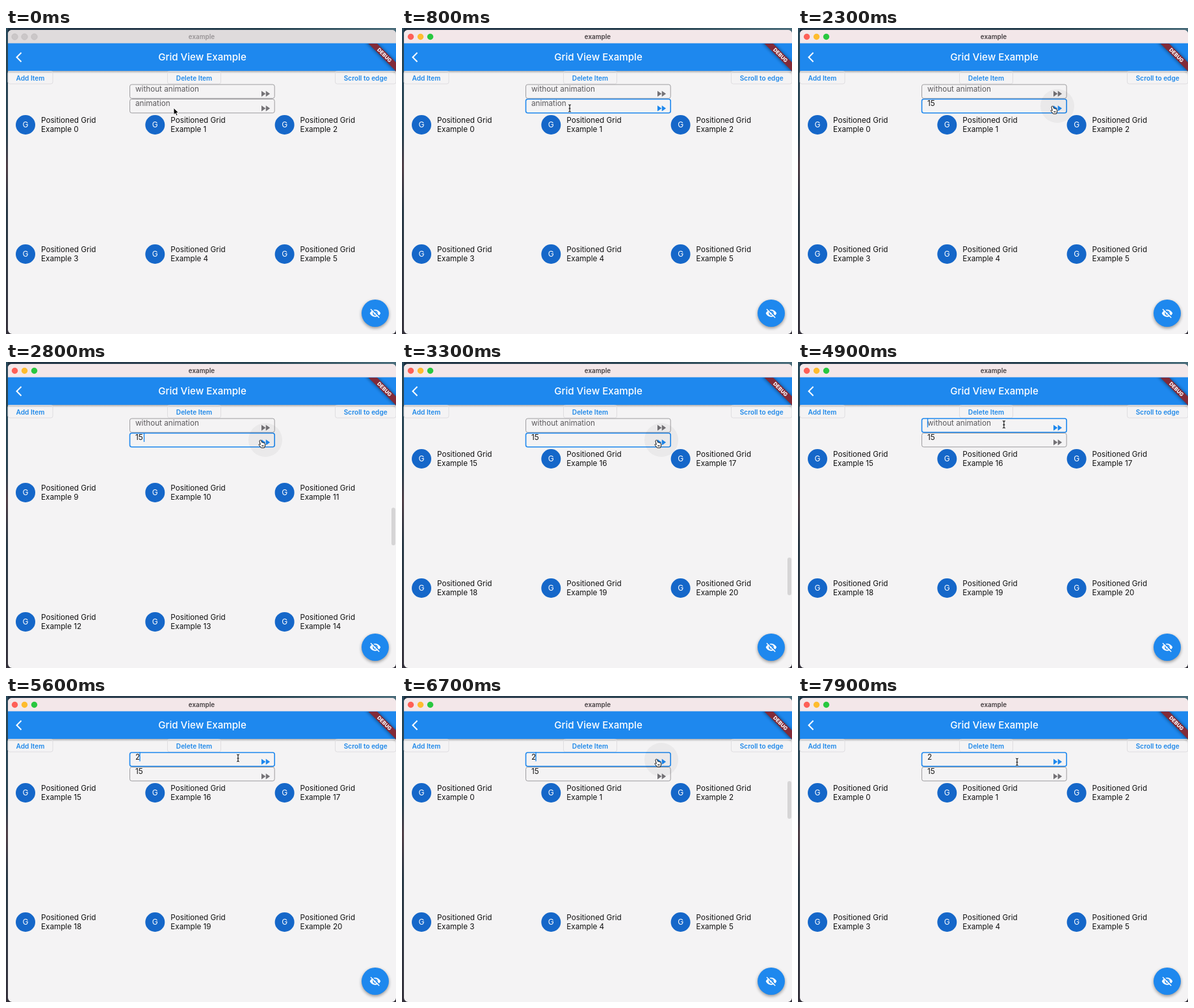
Write an HTML page that moves like this. It is 600x471 px and loops after 8 s.

```html
<!DOCTYPE html>
<html lang="en">
<head>
<meta charset="utf-8">
<title>Grid view</title>
<style>
  html, body { margin: 0; width: 100%; height: 100%; overflow: hidden; background: #1b2635; }
  svg { display: block; width: 100%; height: 100%; font-family: Inter, Roboto, sans-serif; }
  .label { font-size: 11.7px; }
  .button text { font-size: 10.1px; font-weight: 600; fill: #1e88e9; text-anchor: middle; }
  .button rect { fill: none; stroke: #dfdde0; }
  .field rect { fill: none; }
</style>
</head>
<body>
<svg viewBox="0 0 600 471">
  <defs>
    <linearGradient id="deskTop">
      <stop offset="0" stop-color="#1d3040"/>
      <stop offset=".35" stop-color="#2a3d4e"/>
      <stop offset=".65" stop-color="#26414f"/>
      <stop offset="1" stop-color="#4a6c7a"/>
    </linearGradient>
    <linearGradient id="deskSide" x2="0" y2="1">
      <stop offset="0" stop-color="#28485a"/>
      <stop offset=".35" stop-color="#26404f"/>
      <stop offset=".45" stop-color="#4d3d45"/>
      <stop offset=".6" stop-color="#263744"/>
      <stop offset="1" stop-color="#33303a"/>
    </linearGradient>
    <linearGradient id="barShade" x2="0" y2="1">
      <stop offset="0" stop-opacity=".28"/>
      <stop offset="1" stop-opacity="0"/>
    </linearGradient>
    <filter id="blur" x="-50%" y="-50%" width="200%" height="200%"><feGaussianBlur stdDeviation="2.5"/></filter>
    <clipPath id="listClip"><path d="M3 131H600V471H3Z"/></clipPath>
    <clipPath id="barClip"><path d="M3 24H600V471H3Z"/></clipPath>
    <path id="forward" d="M4 18l8.5-6L4 6v12zm9-12v12l8.5-6L13 6z"/>
  </defs>

  <rect width="600" height="471" fill="url(#deskSide)"/>
  <rect x="3" width="597" height="10" fill="url(#deskTop)"/>
  <rect x="3" y="3" width="597" height="468" rx="6.500" fill="#f4f3f4"/>
  <path id="titleBar" d="M3 24V9.500Q3 3 9.500 3H593.500Q600 3 600 9.500V24Z"/>
  <g id="lights"></g>
  <text id="winTitle" x="301" y="16.800" font-size="9.900" font-weight="600" text-anchor="middle">example</text>

  <rect x="3" y="66" width="597" height="4" fill="url(#barShade)"/>
  <rect x="3" y="23.500" width="597" height="42.500" fill="#1e88ee"/>
  <path d="M23.500 38L16.500 45L23.500 52" fill="none" stroke="#fff" stroke-width="2"/>
  <text x="302" y="50" font-size="15.100" font-weight="500" fill="#fff" text-anchor="middle">Grid View Example</text>
  <g clip-path="url(#barClip)">
    <g transform="translate(600 24) rotate(45)">
      <rect x="-34" y="20" width="68" height="11" opacity=".45" filter="url(#blur)"/>
      <rect x="-34" y="20.500" width="68" height="9.500" fill="#822a38"/>
      <text y="27.900" font-size="7.900" font-weight="800" fill="#fff" text-anchor="middle">DEBUG</text>
    </g>
  </g>

  <g id="buttons"></g>
  <g clip-path="url(#listClip)"><g id="list"></g></g>
  <g id="fields"></g>
  <rect id="thumb" x="593" width="6" height="58" rx="3" fill="#000" fill-opacity=".12"/>
  <circle id="hover" cx="399" r="26" fill-opacity=".045"/>

  <circle cx="568" cy="441" r="21" opacity=".4" filter="url(#blur)"/>
  <circle cx="568" cy="439" r="21" fill="#1e88ee"/>
  <g transform="translate(559 430) scale(.75)" fill="#fff">
    <path d="M1 12C5 2 19 2 23 12C19 22 5 22 1 12Z"/>
    <circle cx="12" cy="12" r="5" fill="#1e88ee"/>
    <circle cx="12" cy="12" r="3"/>
    <path d="M4.500 2.500L21.500 19.500" stroke="#1e88ee" stroke-width="2"/>
    <path d="M2.700 3.700L20.300 21.300" stroke="#fff" stroke-width="1.900"/>
  </g>

  <g id="pointer">
    <path id="arrow" d="M0 0V10.500L2.500 8.300L4.200 12L6 11.200L4.400 7.600H7.600Z" stroke="#fff" stroke-width=".9"/>
    <g id="beam" fill="none">
      <path d="M-2-5Q0-5 0-3.500Q0-5 2-5M0-4V5M-2 6Q0 6 0 4.500Q0 6 2 6M-1.500 1H1.500" stroke="#fff" stroke-width="2.400" opacity=".7"/>
      <path d="M-2-5Q0-5 0-3.500Q0-5 2-5M0-4V5M-2 6Q0 6 0 4.500Q0 6 2 6M-1.500 1H1.500" stroke="#111" stroke-width="1.100"/>
    </g>
    <path id="hand" d="M-2.500-4.500Q-1.200-5.600-.4-4L.8-1Q2-1.800 2.600-.7Q3.800-1.200 4.200 0Q5.400-.2 5.500 1.200V4L4.500 7H-.5L-4 2.500Q-4 1.200-2.600 1.500L-1.600 2.200L-3-3Q-3-4-2.500-4.500ZM1 3V5M2.700 3V5" fill="#fff" stroke="#111"/>
  </g>
</svg>

<script>
const LOOP = 8000, STEP = 100, ROW = 199, VIEW = 340, CONTENT = ROW * 10;
const ACTIVE = 250, FOCUS_TOP = 4500, JUMP = 6500;
const SCROLL_START = 2400, SCROLL_END = 3152, TARGET = ROW * 5;
const BLUE = '#1e88ee';
const $ = id => document.getElementById(id);
const set = (el, attrs) => { for (const k in attrs) el.setAttribute(k, attrs[k]); };
const show = (el, on) => { el.style.display = on ? '' : 'none'; };
const clamp = u => Math.min(1, Math.max(0, u));
const ease = u => u * u * (3 - 2 * u);

$('lights').innerHTML = [13.5, 28.5, 43.5].map(x =>
  `<circle cx="${x}" cy="13.5" r="4.7" stroke-width=".5"/>`).join('');

$('buttons').innerHTML = [['Add Item', 3, 69], ['Delete Item', 248.5, 82], ['Scroll to edge', 506.5, 93.5]]
  .map(([name, x, w]) => `<g class="button"><rect x="${x}" y="66.5" width="${w}" height="19.5" rx="3"/>
    <text x="${x + w / 2}" y="80.500">${name}</text></g>`).join('');

let items = '';
for (let i = 0; i < 30; i++) {
  const x = 30 + (i % 3) * 199.3, y = 149 + Math.floor(i / 3) * ROW;
  items += `<g transform="translate(${x} ${y})"><circle r="15" fill="#1567c9"/>
    <text y="4.300" font-size="12" fill="#fff" text-anchor="middle">G</text>
    <g class="label" fill="#111"><text x="24" y="-3">Positioned Grid</text>
    <text x="24" y="11.300">Example ${i}</text></g></g>`;
}
$('list').innerHTML = items;

const fields = [87, 109.5].map(y => {
  const g = document.createElementNS('http://www.w3.org/2000/svg', 'g');
  g.setAttribute('class', 'field');
  g.innerHTML = `<rect x="190.500" y="${y}" width="222.700" height="21.300" rx="3"/>
    <text class="label" x="199" y="${y + 10.7}"></text>
    <use href="#forward" transform="translate(390 ${y + 5.2}) scale(.75)"/>
    <path stroke="${BLUE}" stroke-width="1.400"/>`;
  $('fields').append(g);
  const [box, text, icon, caret] = g.children;
  return { y, box, text, icon, caret };
});

function drawField(f, value, hint, focused, blink) {
  f.text.textContent = value || hint;
  set(f.text, { fill: value ? '#111' : '#5c5a5d' });
  set(f.box, { stroke: focused ? BLUE : '#949296', 'stroke-width': focused ? 1.6 : .9 });
  set(f.icon, { fill: focused ? BLUE : '#757377' });
  const x = 199.5 + value.length * 6.5;
  set(f.caret, { d: `M${x} ${f.y - .5}v14` });
  show(f.caret, focused && blink);
}

// time, x, y
const path = [
  [0, 258, 123], [1400, 258, 123], [2000, 393, 125], [3500, 393, 125], [4100, 295, 96],
  [4700, 295, 96], [5200, 357, 95], [5800, 357, 95], [6200, 393, 102], [7200, 393, 102],
  [7700, 337, 101], [LOOP, 337, 101]
];
function pointerAt(t) {
  const i = path.findIndex(p => p[0] > t), a = path[i - 1], b = path[i];
  const u = ease((t - a[0]) / (b[0] - a[0]));
  return [a[1] + (b[1] - a[1]) * u, a[2] + (b[2] - a[2]) * u];
}

function draw(t) {
  const active = t >= ACTIVE;
  set($('titleBar'), { fill: active ? '#f3e7e9' : '#dfdbdc' });
  set($('winTitle'), { fill: active ? '#464043' : '#989496' });
  [...$('lights').children].forEach((c, i) => set(c, {
    fill: active ? ['#fe5f57', '#febc2e', '#28c840'][i] : '#cbc7c8',
    stroke: active ? 'none' : '#b7b3b4'
  }));

  const topFocus = t >= FOCUS_TOP;
  const since = [ACTIVE, 1400, FOCUS_TOP, 5400].filter(s => s <= t).pop() ?? 0;
  const blink = Math.floor((t - since) / 500) % 2 === 0;
  drawField(fields[0], t >= 5400 ? '2' : '', 'without animation', topFocus, blink);
  drawField(fields[1], t >= 1400 ? '15' : t >= 1200 ? '1' : '', 'animation', active && !topFocus, blink);

  const run = clamp((t - SCROLL_START) / (SCROLL_END - SCROLL_START));
  const scroll = t >= JUMP ? 0 : TARGET * ease(run);
  set($('list'), { transform: `translate(0 ${-scroll})` });

  const [start, end] = t >= JUMP ? [JUMP, JUMP] : [SCROLL_START, SCROLL_END];
  const fade = Math.min(clamp((t - start) / 150), 1 - clamp((t - end - 600) / 300));
  set($('thumb'), { y: 131 + scroll / CONTENT * VIEW, opacity: fade });

  const [x, y] = pointerAt(t);
  const onIcon = x > 378;
  set($('hover'), { cy: y > 110 ? 120 : 98 });
  show($('hover'), onIcon);
  set($('pointer'), { transform: `translate(${x} ${y})` });
  show($('arrow'), !active);
  show($('beam'), active && !onIcon);
  show($('hand'), onIcon);
}

const begin = performance.now();
function tick() {
  const t = (performance.now() - begin) % LOOP;
  draw(Math.floor(t / STEP) * STEP);
  requestAnimationFrame(tick);
}
tick();
</script>
</body>
</html>
```
